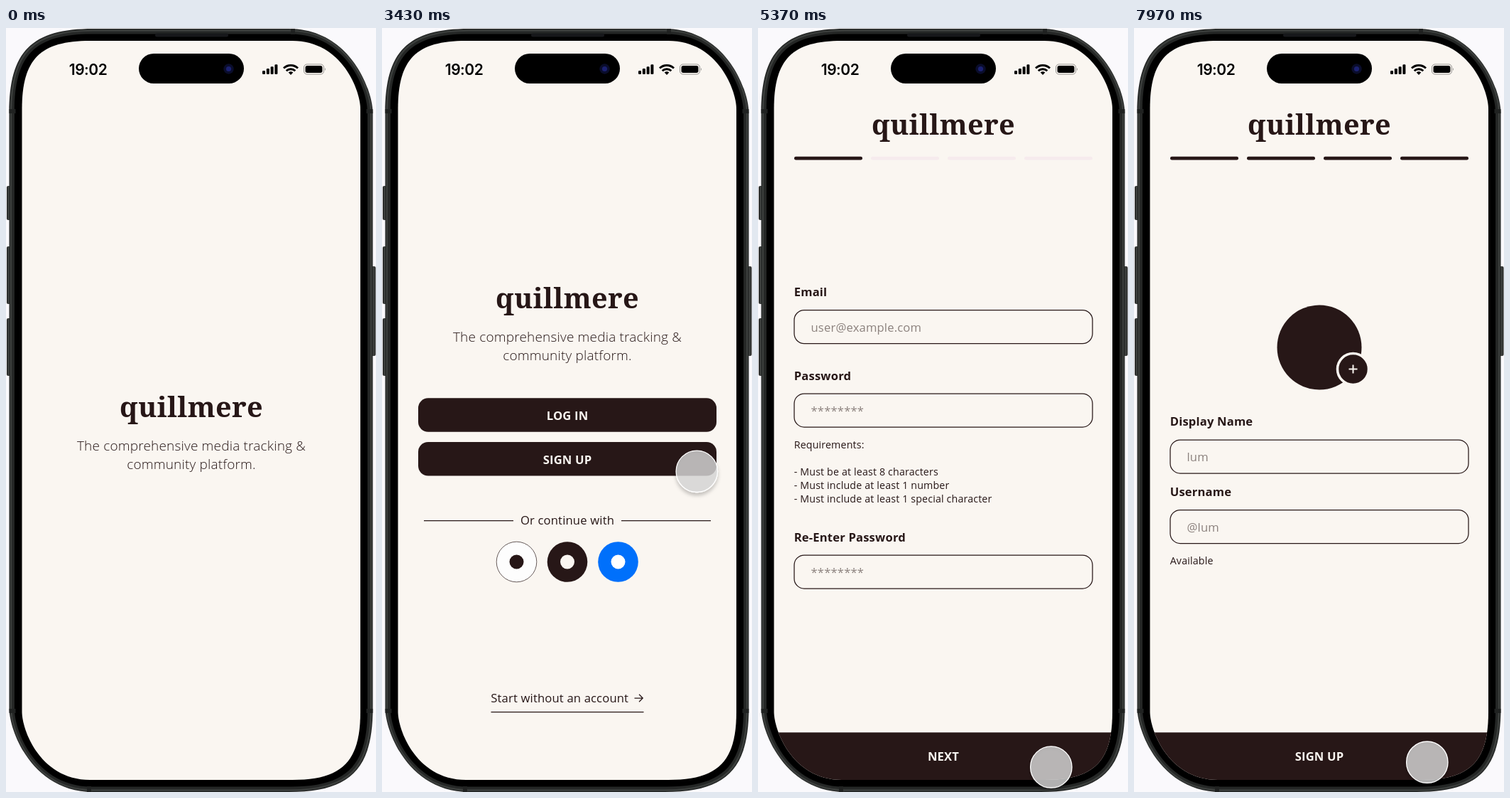
These frames come from a looping animation (521 px wide and 1074 px high, 8000 ms). An HTML page:

```html
<!DOCTYPE html>
<html lang="en">
<head>
<meta charset="utf-8">
<title>Sign-up flow</title>
<style>
  html, body { margin: 0; width: 100%; height: 100%; overflow: hidden; background: #faf9fc; }
  svg { display: block; width: 100vw; height: 100vh; }
  text { font: 16.63px "Open Sans", sans-serif; letter-spacing: .01em; fill: #271717; }
  .mid { text-anchor: middle; }
  .bold { font-weight: 700; }
  .light { fill: #faf6f1; }
  .hint { fill: #8c827e; }
  .small { font-size: 14.25px; }
  .tag { font-size: 19px; font-weight: 300; }
  .logo { font: 700 39.5px "Noto Serif", serif; }
  .clock { font: 600 21px Inter, sans-serif; fill: #000; letter-spacing: -.5px; }
  .line { fill: none; stroke: #271717; stroke-width: 1.25; }
</style>
</head>
<body>
<svg id="stage" viewBox="0 0 521 1074">
  <defs>
    <clipPath id="screen"></clipPath>
    <linearGradient id="key">
      <stop offset="0" stop-color="#1d1f1e"/><stop offset=".45" stop-color="#444745"/><stop offset="1" stop-color="#202221"/>
    </linearGradient>
    <filter id="shadow" x="-30%" y="-30%" width="160%" height="170%">
      <feDropShadow dx="0" dy="4" stdDeviation="2.4" flood-opacity=".25"/>
    </filter>
  </defs>
  <g id="phone"></g>
  <g id="app" clip-path="url(#screen)"></g>
  <g id="status"></g>
  <circle id="cursor" r="29.2" fill="#d9d9d9" fill-opacity=".8" stroke="#fff" stroke-width="1.3" filter="url(#shadow)"/>
</svg>
<script>
const INK = '#271717', CREAM = '#faf6f1', FAINT = '#f6ebed';
const $ = id => document.getElementById(id);

const rect = (x, y, w, h, r, attrs) =>
  `<rect x="${x}" y="${y}" width="${w}" height="${h}" rx="${r}" ${attrs}/>`;
const circle = (x, y, r, fill, extra = '') =>
  `<circle cx="${x}" cy="${y}" r="${r}" fill="${fill}" ${extra}/>`;
const text = (x, y, cls, str) => `<text x="${x}" y="${y}" class="${cls}">${str}</text>`;
const path = (d, attrs) => `<path d="${d}" ${attrs}/>`;
const group = (id, ...parts) => `<g id="${id}">${parts.join('')}</g>`;
const each = (n, make) => Array.from({ length: n }, (_, i) => make(i)).join('');

const button = (y, label) =>
  rect(51, y, 420, 47.5, 14, `fill="${INK}"`) + text(261, y + 30.5, 'mid bold light', label);
const field = (y, hint) =>
  rect(51, y, 420, 47, 14, 'class="line"') + text(74.5, y + 30, 'hint', hint);
const social = (x, fill, dot, extra) => circle(x, 750.5, 28.3, fill, extra) + circle(x, 750.5, 10, dot);

// Rectangle with continuous-curvature corners: each curve starts 1.3 r before the corner
function squircle(x, y, w, h, r, attrs = '') {
  const e = 1.3 * r, k = .348 * r;
  return path(`M${x} ${y + e}c0 ${k - e} ${k} ${-e} ${e} ${-e}h${w - 2 * e}`
    + `c${e - k} 0 ${e} ${e - k} ${e} ${e}v${h - 2 * e}`
    + `c0 ${e - k} ${-k} ${e} ${-e} ${e}h${2 * e - w}`
    + `c${k - e} 0 ${-e} ${k - e} ${-e} ${-e}z`, attrs);
}

// Hardware: side keys, metal frame, bezel, antenna bands
const key = (x, y, h) => rect(x, y, 6, h, 2, 'fill="url(#key)"');
const shell = (inset, attrs) =>
  squircle(4.5 + inset, 1 + inset, 512 - 2 * inset, 1073 - 2 * inset, 91 - inset, attrs);
$('screen').innerHTML = squircle(22.5, 18, 476.5, 1039, 73.7);
$('phone').innerHTML = [
  key(1, 222, 48), key(1, 307, 81), key(1, 408, 81), key(514.5, 335, 126),
  shell(0, 'fill="#222423"'),
  shell(2.5, 'fill="none" stroke="#3b3e3c" stroke-width="2.6"'),
  shell(5.5, 'fill="none" stroke="#252726" stroke-width="2.5"'),
  shell(7.5, 'fill="#000"'),
  [[4.5, 114], [507.5, 114], [4.5, 957], [507.5, 957]].map(([x, y]) => rect(x, y, 9, 6, 0, 'fill="#202221"')).join(''),
  rect(401, 1, 6, 8, 0, 'fill="#202221"'), rect(114, 1066, 6, 8, 0, 'fill="#202221"'),
  rect(210, 7.5, 103, 5, 2.5, 'fill="#17181b"')
].join('');

$('status').innerHTML = [
  text(115.5, 66, 'mid clock', '19:02'),
  rect(187, 36, 148, 42, 21, 'fill="#000"'),
  circle(313.5, 57.5, 7.2, '#0a0d2b'), circle(313.5, 57.5, 3.6, '#1b2170'),
  each(4, i => rect(361 + 5.8 * i, 60 - 2.9 * i, 4, 5 + 2.9 * i, 1.2, '')),
  path('M391 56.5a14.5 14.5 0 0 1 20 0M394.7 60.3a9.2 9.2 0 0 1 12.6 0', 'fill="none" stroke="#000" stroke-width="2.9"'),
  path('M401 66l-3.3-3.4a5 5 0 0 1 6.6 0z', ''),
  rect(419.5, 51, 28, 14, 4.3, 'fill="none" stroke="#000" stroke-opacity=".4"'),
  rect(421.5, 53, 24, 10, 2.7, ''),
  path('M449 56q2 1.8 0 4z', 'fill-opacity=".4"')
].join('');

$('app').innerHTML = [
  rect(22, 17, 478, 1041, 0, `fill="${CREAM}"`),
  group('welcome',
    button(520.3, 'LOG IN'), button(582, 'SIGN UP'),
    path('M59 692.5H185M337 692.5H463', 'class="line"'),
    text(261, 698.3, 'mid', 'Or continue with'),
    social(189.5, '#fdfdfd', INK, `stroke="${INK}" stroke-width=".7"`),
    social(261, INK, CREAM), social(332.5, '#0070fb', '#fff'),
    text(153.3, 947.5, '', 'Start without an account'),
    path('M355.5 942H367M362 936.8L367.2 942L362 947.2', 'class="line"'),
    path('M153.5 961.5H368.5', 'class="line"')),
  group('tagline',
    text(261, 594, 'mid tag', 'The comprehensive media tracking &amp;'),
    text(261, 620, 'mid tag', 'community platform.')),
  group('logo', text(261, 547, 'mid logo', 'quillmere')),
  group('form',
    text(50.7, 377, 'bold', 'Email'), field(396.6, 'user@example.com'),
    text(50.7, 495, 'bold', 'Password'), field(514, '********'),
    ['Requirements:', '', '- Must be at least 8 characters', '- Must include at least 1 number',
      '- Must include at least 1 special character'].map((s, i) => text(50.7, 591 + 19.1 * i, 'small', s)).join(''),
    text(50.7, 722, 'bold', 'Re-Enter Password'), field(741, '********')),
  group('verify',
    text(50.7, 537.5, 'bold', 'Verify Your Account'),
    each(6, i => rect(51 + 71.3 * i, 557, 63.5, 70.5, 14, 'class="line"')
      + text(82.6 + 71.3 * i, 599, 'mid hint', '0'))),
  group('profile',
    circle(261, 449, 59.5, INK),
    circle(308.5, 479.5, 22, INK, `stroke="${CREAM}" stroke-width="3.6"`),
    path('M302.5 479.5h12M308.5 473.5v12', `stroke="${CREAM}" stroke-width="2"`),
    text(50.7, 559.3, 'bold', 'Display Name'), field(579, 'lum'),
    text(50.7, 658, 'bold', 'Username'), field(677.5, '@lum'),
    text(50.7, 754, 'small', 'Available')),
  group('chrome',
    each(4, i => {
      const bar = (fill, id) => rect(51 + 108 * i, 180.8, 96, 4.7, 2.3, `fill="${fill}" ${id}`);
      return bar(FAINT, '') + bar(INK, `id="bar${i}"`);
    }),
    rect(22, 990.3, 478, 68, 0, `fill="${INK}"`),
    group('next', text(261, 1030, 'mid bold light', 'NEXT')),
    group('finish', text(261, 1030, 'mid bold light', 'SIGN UP')))
].join('');

// 0..1 progress of a step that begins at `start`: eased out, or eased at both ends
const part = (t, start, length) => Math.min(1, Math.max(0, (t - start) / length));
const step = (...span) => 1 - (1 - part(...span)) ** 2;
const smooth = (...span) => {
  const p = part(...span);
  return p * p * (3 - 2 * p);
};
const fade = (id, v) => $(id).setAttribute('opacity', v);
const move = (id, x, y) => $(id).setAttribute('transform', `translate(${x} ${y})`);

function draw(t) {
  const open = step(t, 1480, 600), signup = step(t, 3700, 600);
  const code = step(t, 5800, 500), bar3 = step(t, 6850, 300), done = step(t, 7300, 400);

  const rise = -153.5 * open - 244 * signup;
  move('logo', 0, rise);
  move('tagline', 0, rise);
  fade('tagline', 1 - signup);
  fade('welcome', open * (1 - signup));
  fade('chrome', signup);
  fade('form', signup * (1 - code));
  fade('verify', code * (1 - done));
  fade('profile', done);
  [1, code, bar3, done].forEach((v, i) => fade('bar' + i, v));
  fade('next', 1 - done);
  fade('finish', done);

  const down = smooth(t, 4550, 700), settle = smooth(t, 5550, 400);
  move('cursor', 443.3 - 30.5 * down, 623.3 + 415.7 * down - 6.8 * settle);
  fade('cursor', smooth(t, 2950, 300));
}

function tick() {
  draw(performance.now() % 8000);
  requestAnimationFrame(tick);
}
tick();
</script>
</body>
</html>
```
